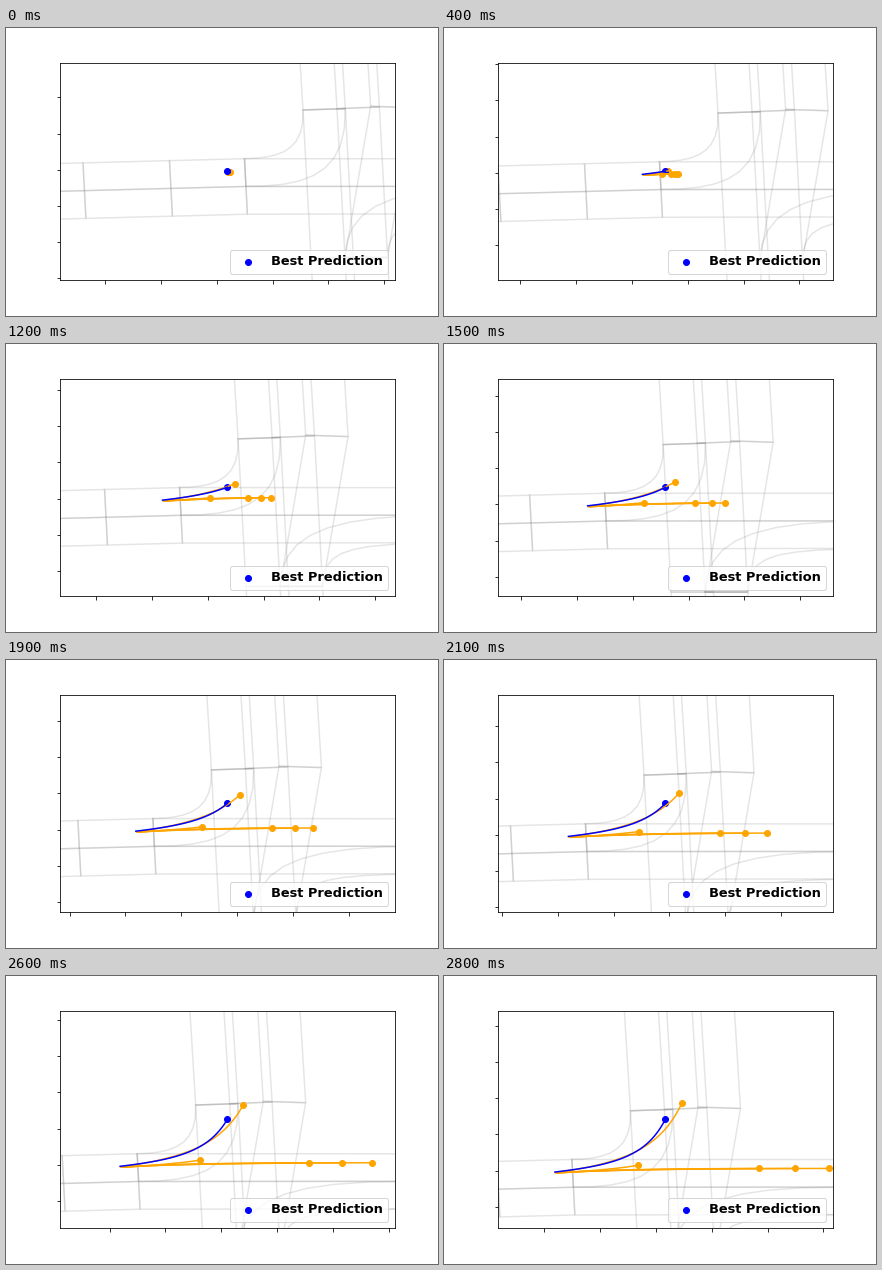
Write a matplotlib script that moves like this. It is 432x288 px and loops after 2900 ms.

```python
import numpy as np
import matplotlib.pyplot as plt
from matplotlib.animation import FuncAnimation

FRAMES, INTERVAL = 29, 100
CENTER = np.array([221.4, 143.28])   # first position of the vehicle
HALF_W, HALF_H = 167.4, 108.72       # half of the visible area
TICK_X, TICK_Y = HALF_W / 3, HALF_H / 3

fig, ax = plt.subplots(figsize=(6, 4), dpi=72)
fig.subplots_adjust(left=0.125, right=0.9, bottom=0.125, top=0.88)
ax.set_xticks(99.3 + TICK_X * np.arange(-4, 12))
ax.set_yticks(69.3 + TICK_Y * np.arange(-6, 10))
ax.tick_params(labelbottom=False, labelleft=False)


def lane(left, right):
    """Outline of a lane between two borders that run the same way."""
    x, y = zip(*left, *right[::-1], left[0])
    ax.plot(x, y, color="grey", alpha=0.2, lw=1.5, zorder=1)


def bezier(a, b, c, d, n=10):
    t = np.linspace(0, 1, n)[:, None]
    a, b, c, d = map(np.array, (a, b, c, d))
    return list((1 - t) ** 3 * a + 3 * t * (1 - t) ** 2 * b
                + 3 * t ** 2 * (1 - t) * c + t ** 3 * d)


def road(x, row):
    """Point on one of the three borders of the sloping left road."""
    return x + 1.45 * row, 130.7 + 0.026 * (238.5 - x) + 27.75 * row


def extend(point, y, lean):
    """Follow a leaning border from a point to the height y."""
    return point[0] + lean * (y - point[1]), y


# Side road: segments split by cross lines, then level towards the right
cuts = [20, 77, 163.5, 238.5]
for row in range(2):
    for a, b in zip(cuts, cuts[1:]):
        lane([road(a, row), road(b, row)], [road(a, row + 1), road(b, row + 1)])
    lane([road(238.5, row), (510, 130.8 + 27.5 * row)],
         [road(238.5, row + 1), (510, 158.3 + 27.5 * row)])

# Main road: three overlapping lanes, the last one slants into the second
heads = [((297, 82), (339.3, 80.6)),
         ((331, 80.7), (373.4, 79)),
         ((364.6, 78.3), (407, 79.7))]
feet = [[extend(p, 229.5, 0.054) for p in pair] for pair in heads[:2]]
for pair in heads:
    lane(*[[extend(p, -60, 0.061), p] for p in pair])
for top, bottom in zip(heads, feet):
    lane(*zip(top, bottom))
    lane(*[[p, extend(p, 280, 0.054)] for p in bottom])
lane(*zip(heads[2], feet[1]))

# Turns between the two roads
lane(bezier(road(238.5, 0), (272, 130), (299, 124), heads[0][0]),
     bezier(road(238.5, 1), (302, 158.5), (341, 146), heads[0][1]))
lane(bezier(feet[1][0], (340, 178), (385, 158), (505, 158.5)),
     bezier(feet[1][1], (382, 193), (405, 187), (505, 186)))

# Motion: turning paths are driven, the others follow a formula
t = np.arange(FRAMES)


def ease(first, last, mid, width):
    """S-shaped change of a value, sampled halfway between the steps."""
    return first + (last - first) / (1 + np.exp((mid - t[:-1] - 0.5) / width))


def drive(start, speed, heading):
    angle = np.radians(heading)
    steps = np.column_stack([speed * np.cos(angle), -speed * np.sin(angle)])
    return CENTER + start + np.vstack([[0, 0], np.cumsum(steps, axis=0)])


def cruise(start, speed, gain, y):
    return CENTER + np.column_stack([start + speed * t + gain * t ** 2, y])


best = drive((0, 0), ease(5.97, 3.12, 14.5, 4.5), ease(5, 70, 18, 5))
straight = 0.8 - 4.7 * (1 - np.exp(-t / 10))
others = [
    cruise(0.9, 6.9, 0.0125, straight),
    cruise(1.5, 7.75, 0.028, straight),
    cruise(1.5, 8.3, 0.051, straight),
    cruise(2.8, 4.35, -0.053, 1 - 0.28 * t),
    drive((2, 0.3), ease(6.1, 4.25, 17, 3), ease(5.5, 74, 18, 5.5)),
]


def trail(color, points, zorder):
    """A line that grows along the points, above the dot at its tip."""
    line, = ax.plot([], [], color=color, lw=1.5, zorder=3 + zorder)
    dot, = ax.plot([], [], "o", color=color, markersize=6, zorder=2 + zorder)
    return line, dot, points


trails = [trail("orange", p, 0) for p in others] + [trail("blue", best, 0.5)]

ax.scatter([], [], s=36, color="blue", label="Best Prediction")
ax.legend(loc="lower right", prop={"weight": "bold", "size": 13})


def update(step):
    for line, dot, points in trails:
        line.set_data(*points[:step + 1].T)
        dot.set_data(*points[step:step + 1].T)
    x, y = best[step]
    ax.set_xlim(x - HALF_W, x + HALF_W)
    ax.set_ylim(y + HALF_H, y - HALF_H)
    return [artist for line, dot, _ in trails for artist in (line, dot)]


update(0)
anim = FuncAnimation(fig, update, frames=FRAMES, interval=INTERVAL,
                     repeat=True, repeat_delay=0, blit=False)
plt.show()
```
